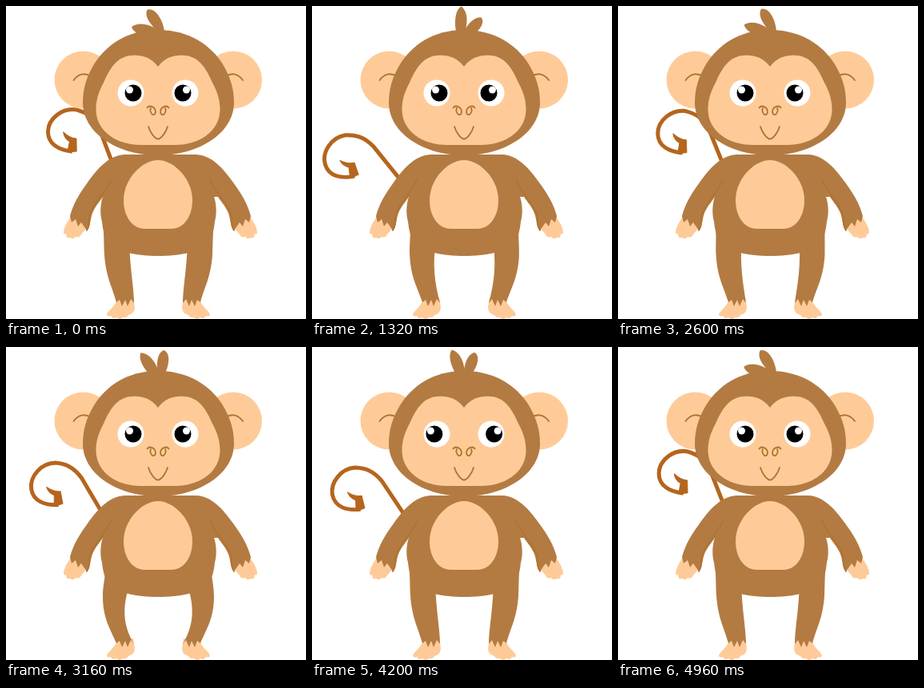
Recreate the animation shown at these times as an HTML page. Size 375 by 392 pixels, loop 5 s.

```html
<!DOCTYPE html>
<html lang="en">
<head>
<meta charset="utf-8">
<title>Monkey</title>
<style>
html, body { margin: 0; width: 100%; height: 100%; overflow: hidden; background: #fff; }
svg { display: block; width: 100vw; height: 100vh; }
.fur { fill: #b37b42; }
.skin { fill: #fecb98; }
.line { fill: none; stroke: #b0732f; stroke-width: 1.8; stroke-linecap: round; stroke-linejoin: round; }
#tail { fill: none; stroke: #b5651d; stroke-width: 5; stroke-linejoin: round; }
#tail .tip { fill: #b5651d; stroke-width: 1; }
</style>
</head>
<body>
<svg viewBox="0 0 375 392">
  <defs>
    <g id="arm">
      <path class="skin" d="M82 261C79 268 73 274 72 283Q72 287 75 285Q75 292 80 290Q84 293 87 289Q92 291 94 286L102 277L104 262Z"/>
      <path class="fur" d="M193 186L148 186C127 187 112 207 102 221C91 236 84 248 80 263L82 271L87 267L90 276L94 271L101 281C106 277 105 265 109 257C113 249 118 244 121 239L193 239Z"/>
      <path class="line" d="M131 218C122 238 108 247 104 264Q105 275 101 281" stroke-width="1.2"/>
    </g>
    <g id="side">
      <path class="skin" d="M139 366C138 376 126 382 126 387Q128 390 131 388Q133 393 138 390Q142 394 146 390Q151 391 153 387Q161 385 161 377L159 365Z"/>
      <path class="fur leg"/>
      <path class="fur" d="M191 190L135 190L122 236C118 246 117 259 120 270C121 280 123 288 127 296C139 308 162 313 191 313Z"/>
    </g>
    <g id="ear">
      <circle class="skin" cx="96.500" cy="92.500" r="36"/>
      <path class="line" d="M84.500 93C90 85 98 83 106 88"/>
    </g>
    <g id="nostril">
      <path class="line" d="M176.500 127.500C179 123.500 187 126 187 133Q186 137 183 136Q179 132 181 128"/>
    </g>
  </defs>

  <g id="tail">
    <path d="M165 291C145 262 126 235 108 213L78 175C66 162 55 160 43 160.500C26 163 13 181 17.500 197C22 212 37 215 54 212"/>
    <path class="tip" d="M50 214L59 210L54 195Q46 197 36 192Q39 199 47 201L48 210Z"/>
  </g>
  <use href="#side"/>
  <use href="#side" transform="matrix(-1 0 0 1 381 0)"/>
  <use href="#arm"/>
  <use href="#arm" transform="matrix(-1 0 0 1 386 0)"/>
  <path class="skin" d="M190 193C210 193 233 217 233 243C233 265 221 279 207 279L173 279C159 279 147 265 147 243C147 217 170 193 190 193Z"/>

  <use href="#ear"/>
  <use href="#ear" transform="matrix(-1 0 0 1 380.500 0)"/>
  <g id="hair" class="fur">
    <path d="M183 38C175 30 166 14 171 5.500C182 7 190 20 192 38Z"/>
    <path d="M190 38C188 20 192 7 200 5C208 9 206 24 196 38Z"/>
  </g>
  <path class="fur" d="M190 30C151 30 125 49 110 73C100 90 96 104 96 122C97 160 140 187 190 187C240 187 284 160 285 122C285 104 281 90 271 73C256 49 229 30 190 30Z"/>
  <path class="skin" d="M190 76C181 64 169 61 157 62C138 63 129 80 122 96C116 107 112.500 117 112.500 130C113 158 140 174 168 174L212 174C240 174 267 158 267.500 130C267.500 117 264 107 258 96C251 80 242 63 223 62C211 61 199 64 190 76Z"/>

  <circle cx="156" cy="109" r="16.500" fill="#fff"/>
  <circle cx="224" cy="109" r="16.500" fill="#fff"/>
  <g id="eyeL"><circle cx="159" cy="109" r="10.500"/><circle cx="154.500" cy="105" r="4.500" fill="#fff"/></g>
  <g id="eyeR"><circle cx="221" cy="109" r="10.500"/><circle cx="225.500" cy="105" r="4.500" fill="#fff"/></g>

  <use href="#nostril"/>
  <use href="#nostril" transform="matrix(-1 0 0 1 380 0)"/>
  <path class="line" d="M178 151C180 158 186 166.500 190 166.500C194 166.500 200 158 202 151"/>
</svg>
<script>
const LOOP = 5000;
const $ = id => document.getElementById(id);
const legs = document.querySelectorAll('.leg');

// [time, value] steps joined by straight lines
const swing = [[0, 0], [1240, 1], [2520, 0], [3800, 1], [5000, 0]];
const bend = [[0, 0], [840, 1], [1680, 0], [2440, 0], [3160, 1], [3880, 0], [5000, 0]];
const look = [[0, 0], [1940, 0], [2240, 1], [2540, 0], [3920, 0], [4240, 1], [4600, 0], [5000, 0]];

const mix = (a, b, k) => a + (b - a) * k;

function at(steps, t) {
  const i = steps.findIndex(s => s[0] > t);
  const [t0, a] = steps[i - 1], [t1, b] = steps[i];
  return mix(a, b, (t - t0) / (t1 - t0));
}

function legPath(k) {
  const m = (a, b) => mix(a, b, k).toFixed(2);
  return `M119 256C${m(123, 129)} 282 ${m(122, 121)} 290 ${m(123, 121)} 312` +
    `C${m(125, 121)} 340 ${m(133, 130)} 352 138 371` +
    'L142 368L145 376L149 368L152 376L156 367L160 372' +
    `C${m(160, 150)} 355 ${m(156, 144)} 335 ${m(154.5, 152)} 306L191 300L191 256Z`;
}

function draw(now) {
  const t = now % LOOP;
  const p = at(swing, t), e = at(look, t), d = legPath(at(bend, t));
  $('tail').setAttribute('transform', `rotate(${19.3 * (0.906 - p)} 165 291)`);
  $('hair').setAttribute('transform', `rotate(${82 * (p - 0.57)} 188 32)`);
  $('eyeL').setAttribute('transform', `translate(${-7 * e} 0)`);
  $('eyeR').setAttribute('transform', `translate(${7.5 * e} 0)`);
  legs.forEach(leg => leg.setAttribute('d', d));
}

const start = performance.now();
function tick() {
  draw(performance.now() - start);
  requestAnimationFrame(tick);
}
tick();
</script>
</body>
</html>
```
